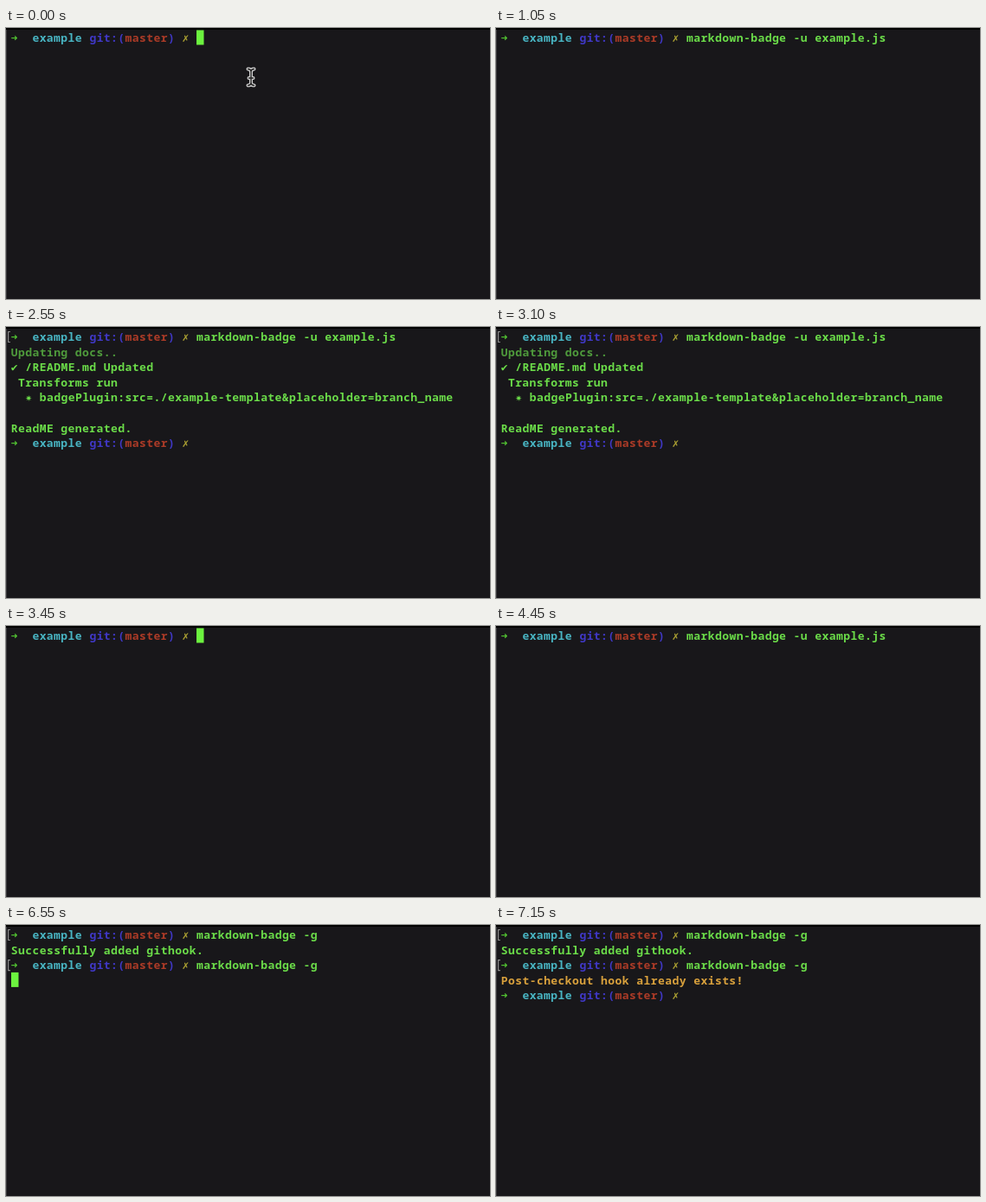
Write an HTML page that moves like this. It is 559 by 314 pixels and loops after 7200 ms.

```html
<!DOCTYPE html>
<html lang="en">
<head>
<meta charset="utf-8">
<title>Terminal session</title>
<style>
html, body { margin: 0; width: 100%; height: 100%; overflow: hidden; background: #18171a; }
svg { display: block; width: 559px; height: 314px; }
text {
  font: 600 13px "Noto Sans Mono", "DejaVu Sans Mono", monospace;
  letter-spacing: .44px;
  white-space: pre;
  fill: #6bdc49;
}
.prompt text { font-weight: 700; }
.prompt .arrow { fill: #52c432; }
.prompt .dir { fill: #48b4c2; }
.prompt .git { fill: #4038c6; }
.prompt .branch { fill: #ac3b27; }
.prompt .dirty { fill: #aca132; }
.dim { fill: #4f9b3c; }
.warn { fill: #d8a03c; }
.bracket { fill: none; stroke: #8a8a8a; stroke-width: 1.2; }
.beam { fill: none; stroke: #d2d2d2; stroke-width: 4; stroke-linecap: round; }
.beam .core { stroke: #222; stroke-width: 1.4; }

.anim { animation: 7200ms step-end infinite; }
.mouse { animation-name: mouse; }
.update { animation-name: update; }
.mark1 { animation-name: mark1; }
.docs { animation-name: docs; }
.report { animation-name: report; }
.hook { animation-name: hook; }
.added { animation-name: added; }
.again { animation-name: again; }
.hook2 { animation-name: hook2; }
.mark2 { animation-name: mark2; }
.exists { animation-name: exists; }
.cursor { fill: #6cf33f; animation-name: cursor; }

@keyframes mouse { 0% { visibility: visible } 4.51%, 100% { visibility: hidden } }
@keyframes update {
  0%, 44.1% { visibility: hidden }
  4.51%, 49.65% { visibility: visible }
  63.54%, 100% { visibility: hidden }
}
@keyframes mark1 {
  0%, 44.1% { visibility: hidden }
  22.57%, 69.79%, 100% { visibility: visible }
}
@keyframes docs { 0%, 44.1%, 100% { visibility: hidden } 23.96% { visibility: visible } }
@keyframes report { 0%, 44.1%, 100% { visibility: hidden } 30.21% { visibility: visible } }
@keyframes hook { 0% { visibility: hidden } 63.54%, 100% { visibility: visible } }
@keyframes added { 0% { visibility: hidden } 73.96%, 100% { visibility: visible } }
@keyframes again { 0% { visibility: hidden } 76.74%, 100% { visibility: visible } }
@keyframes hook2 { 0% { visibility: hidden } 81.6%, 100% { visibility: visible } }
@keyframes mark2 { 0% { visibility: hidden } 87.15%, 100% { visibility: visible } }
@keyframes exists { 0% { visibility: hidden } 92.71%, 100% { visibility: visible } }
@keyframes cursor {
  0%, 44.1% { visibility: visible; transform: translate(220px, 2.5px) }
  4.51%, 30.21%, 49.65%, 76.74%, 92.71%, 100% { visibility: hidden; transform: none }
  22.57% { visibility: visible; transform: translate(6px, 20.1px) }
  23.96% { visibility: visible; transform: translate(6px, 37.5px) }
  69.1% { visibility: visible; transform: translate(360px, 2.5px) }
  70.49% { visibility: visible; transform: translate(6px, 20.1px) }
  73.96% { visibility: visible; transform: translate(6px, 37.5px) }
  84.38% { visibility: visible; transform: translate(360px, 37.7px) }
  87.15% { visibility: visible; transform: translate(6px, 54.9px) }
}
</style>
</head>
<body>
<svg viewBox="0 0 559 314">
  <defs>
    <g id="prompt" class="prompt">
      <text class="arrow" x="5.7" y="16">➜</text>
      <text class="dir" x="30.4" y="16">example</text>
      <text class="git" x="96.4" y="16">git:(</text>
      <text class="branch" x="137.6" y="16">master</text>
      <text class="git" x="187" y="16">)</text>
      <text class="dirty" x="203.5" y="16">✗</text>
    </g>
    <path id="bracket" class="bracket" d="M5 5.5H2.6V17.5H5"/>
    <path id="beam" d="M279.5 47.5q3.5 0 3.5 3.5V63q0 3.5-3.5 3.5M286.5 47.5q-3.5 0-3.5 3.5M283 63q0 3.5 3.5 3.5M280.5 58h5"/>
  </defs>

  <rect width="559" height="314" fill="#18171a"/>
  <rect width="559" height="2" fill="#020202"/>
  <rect y="2" width="1" height="312" fill="#3c3c3e"/>

  <use href="#prompt"/>
  <use class="anim mark1" href="#bracket"/>
  <text class="anim update" x="220" y="16">markdown-badge -u example.js</text>
  <text class="anim docs dim" x="5.7" y="33.6">Updating docs..</text>
  <g class="anim report">
    <text x="5.7" y="51.2">✔</text>
    <text x="22.2" y="51.2">/README.md Updated</text>
    <text x="13.9" y="68.8">Transforms run</text>
    <text x="22.2" y="86.4">✷</text>
    <text x="38.7" y="86.4">badgePlugin:src=./example-template&amp;placeholder=branch_name</text>
    <text x="5.7" y="121.6">ReadME generated.</text>
    <use href="#prompt" y="123.2"/>
  </g>

  <text class="anim hook" x="220" y="16">markdown-badge -g</text>
  <text class="anim added" x="5.7" y="33.6">Successfully added githook.</text>
  <use class="anim again" href="#prompt" y="35.2"/>
  <use class="anim mark2" href="#bracket" y="35.2"/>
  <text class="anim hook2" x="220" y="51.2">markdown-badge -g</text>
  <g class="anim exists">
    <text class="warn" x="5.7" y="68.8">Post-checkout hook already exists!</text>
    <use href="#prompt" y="70.4"/>
  </g>

  <rect class="anim cursor" width="8.5" height="17"/>
  <g class="anim mouse beam">
    <use href="#beam"/>
    <use class="core" href="#beam"/>
  </g>
</svg>
</body>
</html>
```
